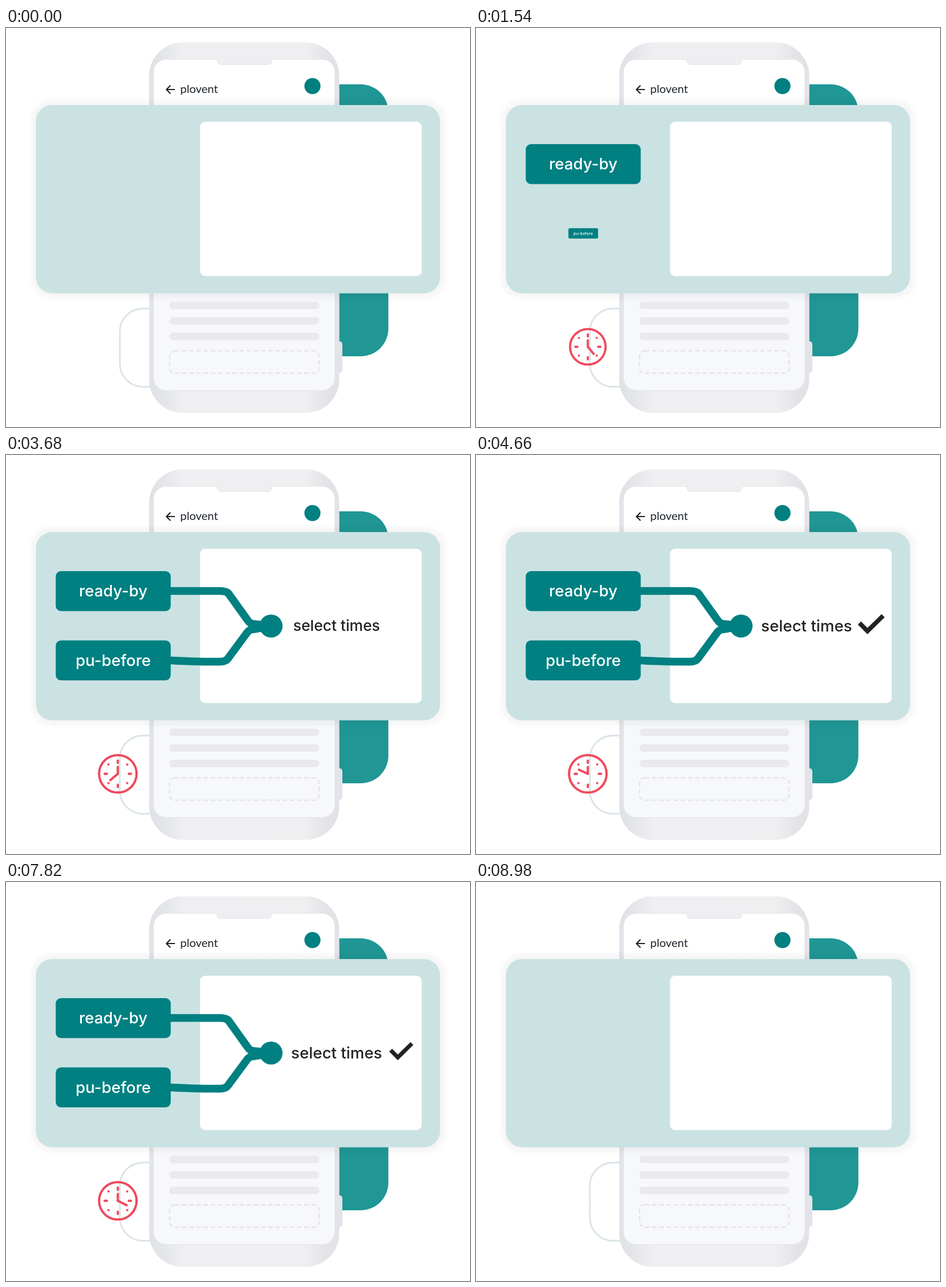
Animation of 807x694 px, one loop 9000 ms. Source, as an HTML page:

```html
<!DOCTYPE html>
<html lang="en">
<head>
<meta charset="utf-8">
<title>Select times</title>
<style>
  html, body { margin: 0; width: 100%; height: 100%; overflow: hidden; background: #fff; }
  svg { display: block; }
  .label { font: 500 27.5px Inter, sans-serif; text-anchor: middle; }
  .brand { font: 20px Lato, sans-serif; fill: #1d232b; }
  .button rect { fill: #008081; }
  .button text { fill: #fff; }
  .wire { fill: none; stroke: #008081; stroke-width: 13.5; stroke-linecap: round; stroke-linejoin: round; }
  #clock { fill: none; stroke: #f1495c; stroke-width: 4; stroke-linecap: round; }
</style>
</head>
<body>
<svg width="807" height="694" viewBox="0 0 807 694">
  <defs>
    <linearGradient id="body">
      <stop offset="0" stop-color="#dfe1e6"/>
      <stop offset=".07" stop-color="#e3e5e9"/>
      <stop offset=".18" stop-color="#efeff2"/>
      <stop offset=".82" stop-color="#efeff1"/>
      <stop offset=".93" stop-color="#e4e4e8"/>
      <stop offset="1" stop-color="#e1e1e6"/>
    </linearGradient>
    <linearGradient id="screen" x2="0" y2="1">
      <stop offset=".1" stop-color="#fff"/>
      <stop offset=".7" stop-color="#f7f8fb"/>
    </linearGradient>
    <filter id="soft" x="-10%" y="-10%" width="120%" height="120%"><feGaussianBlur stdDeviation="5"/></filter>
  </defs>

  <rect x="480" y="98" width="185" height="473" rx="48" fill="#209795"/>
  <rect x="198" y="488" width="120" height="136" rx="40" fill="none" stroke="#dbe5e5" stroke-width="3"/>

  <rect x="570" y="545" width="15" height="55" rx="5" fill="#e2e2e7"/>
  <rect x="249" y="25" width="330.500" height="644.500" rx="58" fill="url(#body)"/>
  <path d="M249.500 90V604M579 90V604" stroke="#e2e4e9"/>
  <rect x="250" y="80" width="329" height="534" fill="#e2e4e9"/>
  <rect x="256.500" y="54.500" width="315.500" height="576" rx="22" fill="url(#screen)" stroke="#e3e4e8"/>
  <path d="M367 54v2q0 7.500 7 7.500h81q7 0 7-7.500v-2" fill="#efeff1" stroke="#e1e2e6"/>
  <path d="M367.500 53h94v2h-94z" fill="#efeff1"/>
  <path d="M293 107H279M285.500 100.500L279 107L285.500 113.500" fill="none" stroke="#1d232b" stroke-width="2.200" stroke-linecap="round" stroke-linejoin="round"/>
  <text class="brand" x="303" y="112.500">plovent</text>
  <circle cx="533" cy="101" r="14" fill="#008081"/>
  <g fill="#eaeaee">
    <rect x="284" y="476" width="261" height="13" rx="6.500"/>
    <rect x="284" y="503" width="261" height="13" rx="6.500"/>
    <rect x="284" y="530" width="261" height="13" rx="6.500"/>
  </g>
  <rect x="284.500" y="561.500" width="260" height="39" rx="9" fill="none" stroke="#e1e1e6" stroke-width="2" stroke-dasharray="8 4.500"/>

  <rect x="44" y="125" width="720" height="345" rx="34" fill="#000" opacity=".035" filter="url(#soft)"/>
  <rect x="52" y="134" width="703" height="327.500" rx="28" fill="#cbe2e3"/>
  <rect x="337.500" y="163" width="385.500" height="268.500" rx="9" fill="#fff"/>

  <g id="flow">
    <path class="wire" id="wire1" pathLength="1" d="M276 236.500H372Q383 236.500 387 241L420 287Q424 293.500 431 294L461 297"/>
    <path class="wire" id="wire2" pathLength="1" d="M276 357Q340 360 372 359.500Q382 359.500 386 354L420 308Q424 303 431 303L461 298"/>
    <circle id="dot" cx="461" cy="297.500" r="20" fill="#008081"/>
    <g id="ready" class="button">
      <rect x="86.500" y="202" width="200" height="69.500" rx="9"/>
      <text class="label" x="186.500" y="246">ready-by</text>
    </g>
    <g id="before" class="button">
      <rect x="86.500" y="322.500" width="200" height="69.500" rx="9"/>
      <text class="label" x="186.500" y="366.500">pu-before</text>
    </g>
    <text id="caption" class="label" x="575" y="306.500" fill="#222">select times</text>
    <path id="check" d="M669 292.500L681.500 305L706 281" fill="none" stroke="#222" stroke-width="7"/>
  </g>

  <g id="clock">
    <circle cx="194.500" cy="554.500" r="32.600"/>
    <path d="M194.500 531.500v4M194.500 573.500v4M171.500 554.500h4M213.500 554.500h4"/>
    <path d="M178.200 538.200h.01M210.800 538.200h.01M178.200 570.800h.01M210.800 570.800h.01"/>
    <path d="M194.500 542.500v12"/>
    <path id="hand" d="M194.500 554.500v-17"/>
  </g>
</svg>
<script>
  const LOOP = 9000;
  const $ = id => document.getElementById(id);
  const progress = (t, start, length) => Math.min(1, Math.max(0, (t - start) / length));
  const ease = p => (1 - Math.cos(Math.PI * p)) / 2;

  // Grow past full size, then settle back to it.
  const pop = (t, start, rise = 500, settle = 280, peak = 1.1) =>
    peak * ease(progress(t, start, rise)) - (peak - 1) * ease(progress(t, start + rise, settle));

  function scale(id, x, y, s) {
    $(id).style.visibility = s > 0.001 ? "visible" : "hidden";
    $(id).setAttribute("transform", `translate(${x} ${y}) scale(${s}) translate(${-x} ${-y})`);
  }

  function drawWire(id, p) {
    $(id).style.visibility = p > 0 ? "visible" : "hidden";
    $(id).setAttribute("stroke-dasharray", `${p} 2`);
  }

  function render(t) {
    scale("ready", 186.5, 236.75, pop(t, 760));
    scale("before", 186.5, 357.25, pop(t, 1380));
    drawWire("wire1", progress(t, 2180, 640));
    drawWire("wire2", progress(t, 2540, 640));
    scale("dot", 461, 297.5, pop(t, 2640));
    scale("caption", 575, 297, pop(t, 3300));
    scale("check", 687.5, 294.5, pop(t, 4120, 500, 280, 1.12));
    $("flow").setAttribute("opacity", 1 - progress(t, 8620, 350));

    const size = t < 5000
      ? pop(t, 946, 800, 300, 1.12)
      : pop(9020 - t, 0, 675, 400, 1.12);
    scale("clock", 194.5, 554.5, size);
    const angle = 135 + 360 * ease(progress(t, 900, 8100));
    $("hand").setAttribute("transform", `rotate(${angle} 194.5 554.5)`);
  }

  function tick() {
    render(performance.now() % LOOP);
    requestAnimationFrame(tick);
  }
  tick();
</script>
</body>
</html>
```
